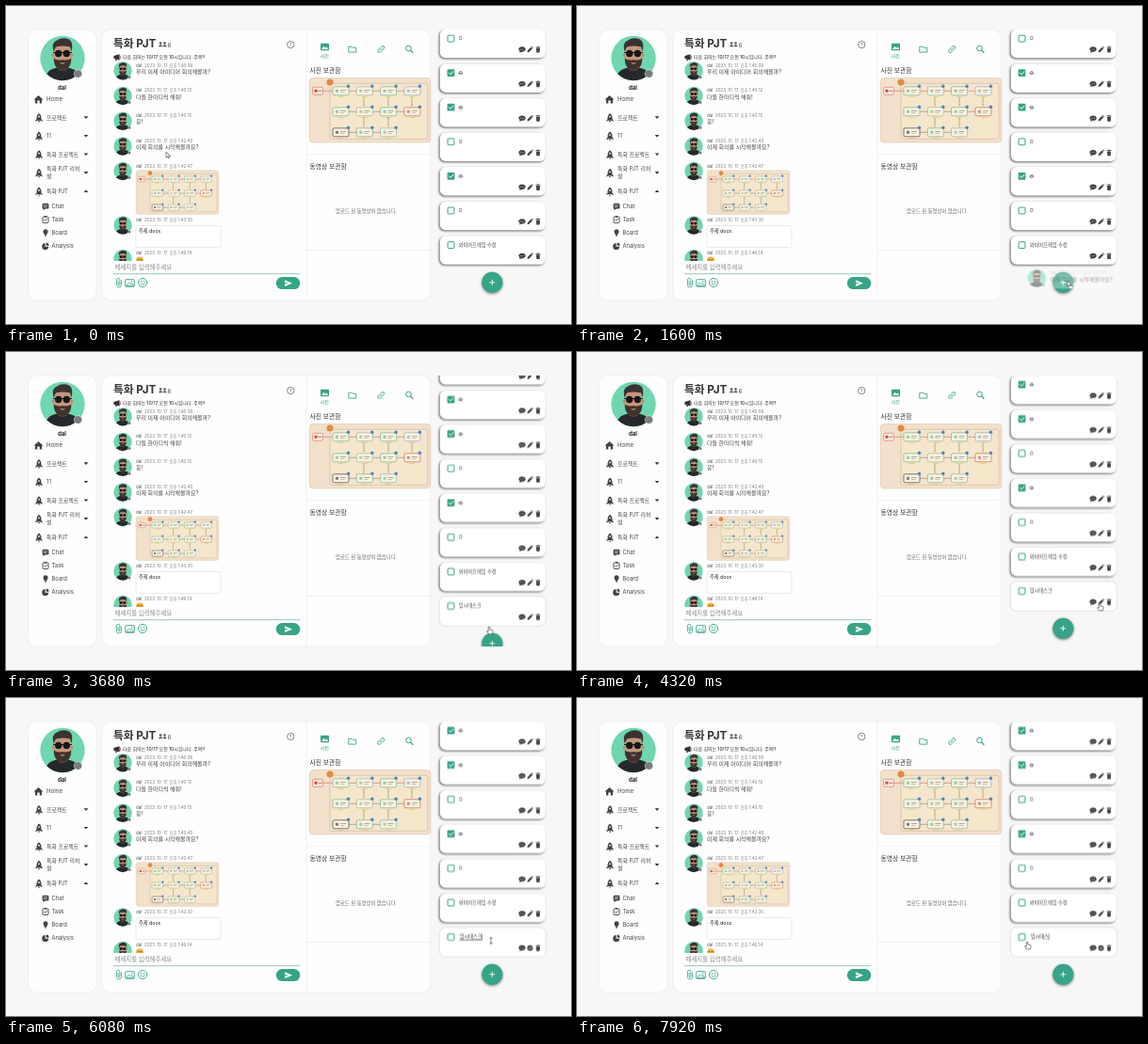
Write an HTML page that moves like this. It is 600 px wide and 338 px high and loops after 8 s.

```html
<!DOCTYPE html>
<html>
<head>
<meta charset="utf-8">
<title>Team chat</title>
<style>
html, body { margin: 0; width: 100%; height: 100%; overflow: hidden; background: #f7f7f7; }
svg { display: block; width: 100vw; height: 100vh; }
text { font-family: Inter, 'Noto Sans CJK KR', 'Noto Sans CJK', sans-serif; white-space: pre; }
.panel { fill: #fefefe; filter: drop-shadow(0 0 1px #0001); }
.card { fill: #fff; filter: drop-shadow(-.3px 1.4px 1.3px #0009); }
.card.soft { filter: drop-shadow(0 .6px 1.2px #0003); }
.fab { fill: #36a487; filter: drop-shadow(0 1.4px 1.5px #0008); }
.ln { fill: none; stroke-linecap: round; stroke-linejoin: round; }
.run, .run * { animation-duration: 8s; animation-iteration-count: infinite; animation-timing-function: linear; }
.step { animation-timing-function: step-end !important; }

#pointer { animation-name: travel; }
@keyframes travel {
  0%, 1% { transform: translate(170px, 155px); }
  2% { transform: translate(163px, 154px); }
  6.5% { transform: translate(320px, 226px); }
  11% { transform: translate(449.5px, 272.5px); }
  16% { transform: translate(508px, 289px); }
  21% { transform: translate(530px, 295px); }
  27%, 32% { transform: translate(521px, 296px); }
  38% { transform: translate(517px, 293px); }
  43%, 47% { transform: translate(513px, 292px); }
  53%, 57% { transform: translate(555px, 267px); }
  63%, 67% { transform: translate(579px, 275px); }
  74%, 90% { transform: translate(515px, 258px); }
  98%, 100% { transform: translate(478px, 259px); }
}
#list { animation-name: scroll; }
@keyframes scroll {
  0%, 44% { transform: translateY(0); }
  46% { transform: translateY(-20.5px); }
  48%, 100% { transform: translateY(-36.5px); }
}
#add { animation-name: push; }
@keyframes push { 0% { transform: translateY(0); } 43%, 100% { transform: translateY(36.5px); } }

#fresh { animation-name: fresh; }
@keyframes fresh { 0% { opacity: 0; } 43%, 100% { opacity: 1; } }
#ghost { animation-name: ghost; }
@keyframes ghost { 0% { opacity: 0; } 2% { opacity: 1; } 38%, 100% { opacity: 0; } }
#arrow { animation-name: arrow; }
@keyframes arrow { 0% { opacity: 1; } 2% { opacity: 0; } 59% { opacity: 1; } 71%, 100% { opacity: 0; } }
#deny { animation-name: deny; }
@keyframes deny { 0% { opacity: 0; } 2% { opacity: 1; } 16%, 100% { opacity: 0; } }
#drop { animation-name: drop; }
@keyframes drop { 0% { opacity: 0; } 16% { opacity: 1; } 38%, 100% { opacity: 0; } }
#hand { animation-name: hand; }
@keyframes hand { 0% { opacity: 0; } 38% { opacity: 1; } 59% { opacity: 0; } 97%, 100% { opacity: 1; } }
#beam { animation-name: beam; }
@keyframes beam { 0% { opacity: 0; } 71% { opacity: 1; } 97%, 100% { opacity: 0; } }
#view { animation-name: view; }
@keyframes view { 0% { opacity: 1; } 56%, 100% { opacity: 0; } }
#edit { animation-name: edit; }
@keyframes edit { 0% { opacity: 0; } 56%, 100% { opacity: 1; } }
#full { animation-name: full; }
@keyframes full { 0% { opacity: 0; } 56% { opacity: 1; } 95%, 100% { opacity: 0; } }
#marked { animation-name: marked; }
@keyframes marked { 0% { opacity: 0; } 74% { opacity: 1; } 95%, 100% { opacity: 0; } }
#cut { animation-name: cut; }
@keyframes cut { 0% { opacity: 0; } 95%, 100% { opacity: 1; } }
</style>
</head>
<body>
<svg id="stage" viewBox="0 0 600 338" preserveAspectRatio="none"></svg>
<script>
const GREEN = '#36a487', INK = '#444', USER = 'dal';

const text = (x, y, size, str, fill = INK, extra = '') =>
  `<text x="${x}" y="${y + size * 0.36}" font-size="${size}" fill="${fill}" ${extra}>${str}</text>`;
const bold = 'font-weight="700" ', medium = 'font-weight="500" ', mid = 'text-anchor="middle" ';
const rect = (x, y, w, h, r, attrs) => `<rect x="${x}" y="${y}" width="${w}" height="${h}" rx="${r}" ${attrs}/>`;
const circle = (x, y, r, attrs) => `<circle cx="${x}" cy="${y}" r="${r}" ${attrs}/>`;
const path = (d, attrs) => `<path d="${d}" ${attrs}/>`;
const at = (x, y, body) => `<g transform="translate(${x} ${y})">${body}</g>`;
const line = (d, w = 1, color = GREEN, extra = '') => path(d, `class="ln" stroke-width="${w}" stroke="${color}" ${extra}`);
const use = (id, x, y, s) => `<use href="#${id}" transform="translate(${x} ${y}) scale(${s})"/>`;
const ring = (w, color = GREEN) => `fill="none" stroke="${color}" stroke-width="${w}"`;
const fill = color => `fill="${color}"`;

// Avatar around the centre, radius 24
const avatar = `<g id="avatar">
  ${circle(0, 0, 23.7, fill('#6fd6b0'))}
  <g clip-path="url(#disc)">
    ${path('M-19 26C-18 13-12 10 0 10S18 13 19 26Z', fill('#26282b'))}
    ${rect(-5, 4, 10, 9, 4, fill('#8f5c44'))}
    ${circle(-9.5, -3, 2, fill('#b98a70'))}${circle(9.5, -3, 2, fill('#b98a70'))}
    ${rect(-9, -15, 18, 25, 8.5, fill('#c6977d'))}
    ${path('M-9.5-7Q-12-17-6-19Q0-23 7-20Q12-17 9.5-7L8-12Q0-14-7-12Z', fill('#3a3231'))}
    ${path('M-9.300 0Q-6 3 0 1.500Q6 3 9.300 0Q9.500 8 5 11Q0 14-5 11Q-9.500 8-9.300 0Z', fill('#40322c'))}
    ${path('M-3 5Q0 4 3 5Q0 7.500-3 5Z', fill('#b57f70'))}
    ${circle(-4.3, -5, 3.7, fill('#17181a'))}${circle(4.3, -5, 3.7, fill('#17181a'))}
    ${line('M-9.500-6H9.500', 1, '#17181a')}
  </g></g>`;

// Architecture sketch, 129 x 69
function sketch() {
  const node = (x, y, c) => at(x, y,
    rect(-8.5, -4.5, 17, 9, 1.2, `fill="#f9f1df" stroke="${c}" stroke-width=".7"`) +
    rect(-5.5, -1.6, 3, 3, .5, `fill="${c}" opacity=".7"`) +
    rect(-.5, -1.3, 6, .8, 0, fill('#9a9c94')) + rect(-.5, .7, 4.5, .8, 0, fill('#b6b3a9')) +
    circle(8, -5, 1.7, fill('#4c83bd')) +
    rect(-3, 5.6, 6, 1.2, .4, fill('#e8cd8a')));
  const colors = ['#74b48e', '#8bb7a4', '#74b48e', '#8fabc0', '#74b48e', '#9cb98a', '#74b48e', '#d66350', '#444', '#74b48e', '#8bb7a4'];
  let s = rect(.2, .2, 128.6, 68.6, 4, 'fill="#f2e0ca" stroke="#d3bda2" stroke-width=".5"') +
    rect(22, 6, 104, 59, 2, 'fill="#f5e5cf" stroke="#c4a988" stroke-width=".5"');
  for (let i = 0; i < 4; i++)
    s += rect(23.5 + i * 25.3, 8.5, 20, 54, 1, 'fill="#f5e9c6" opacity=".5"');
  s += line('M14 14H25M43 14H50M68 14H75M94 14H101', .6, '#c75545', 'stroke-dasharray="1.5 1.2"') +
    line('M43 36H50M68 36H75M94 36H101M43 58H50M68 58H75M58 20V30M84 20V30M109 20V30M58 43V52M84 43V52', .6, '#6f6a64', 'stroke-dasharray="1.5 1.2"') +
    rect(3.5, 10, 11, 8, 1.5, 'fill="#f8e9dc" stroke="#dd7f6b" stroke-width=".7"') +
    rect(5.5, 12.5, 3, 3, .5, fill('#d9493c')) + rect(9.5, 13.5, 4, .9, 0, fill('#94786c'));
  colors.forEach((c, i) => { s += node(33.5 + i % 4 * 25.3, 14 + Math.floor(i / 4) * 22, c); });
  return `<g id="sketch">${s}${circle(22, 4.7, 3.5, fill('#e08a45'))}</g>`;
}

const defs = `<defs>
  <clipPath id="disc">${circle(0, 0, 23.7, '')}</clipPath>
  <clipPath id="chatBox">${rect(102, 59.5, 217, 211.5, 0, '')}</clipPath>
  <clipPath id="listBox">${rect(452, 25.5, 140, 287.5, 0, '')}</clipPath>
  <radialGradient id="haze" gradientUnits="userSpaceOnUse" cx="162" cy="154" r="75">
    <stop stop-color="#fff" stop-opacity=".4"/><stop offset="1" stop-color="#fff" stop-opacity="0"/>
  </radialGradient>
  ${avatar}${sketch()}</defs>`;

function sidebar() {
  const rocket = path('M0-4.500Q3-2 2.400 1.500L3.600 3V4.200L1.500 3.200H-1.500L-3.600 4.200V3L-2.400 1.500Q-3-2 0-4.500ZM-1 3.600H1L0 5.500Z', fill(INK)) +
    circle(0, -1, .9, fill('#fff'));
  const caret = up => path(up ? 'M-2.300 1.200H2.300L0-1.400Z' : 'M-2.300-1.200H2.300L0 1.400Z', fill('#333'));
  let s = rect(24, 25.5, 71.5, 287, 9, 'class="panel"') +
    circle(60, 55.5, 25.3, 'fill="#fff" stroke="#eceeed" stroke-width=".5"') + use('avatar', 60, 55.5, 1) +
    circle(76.5, 72, 4.3, 'fill="#777c7c" stroke="#fff" stroke-width=".5"') +
    text(59.5, 87, 6.1, USER, '#222', bold + mid) +
    at(34.5, 99.5, path('M-5 0L0-4.500L5 0H3.600V4H1.200V1H-1.200V4H-3.600V0Z', fill(INK))) +
    text(43, 99.3, 6.1, 'Home');
  ['프로젝트', '11', '특화 프로젝트', '', '특화 PJT'].forEach((label, i) => {
    const y = 118.5 + i * 19.6;
    s += at(35, y, rocket) + text(43, y, 5.9, label) + at(85, y, caret(i === 4));
  });
  s += text(43, 173, 5.9, '특화 PJT 리허') + text(43, 181, 5.9, '설');
  const icons = [
    rect(-3.4, -3.3, 6.8, 5.8, 1.3, fill(INK)) + path('M-2.500 2V4.200L0 2Z', fill(INK)) + line('M-1.700-1.300H1.700M-1.700.500H1', .6, '#fff'),
    rect(-3, -3.2, 6, 6.6, .8, ring(.9, INK)) + line('M-1.400.200L-.300 1.300L1.600-1', .8, INK) + rect(-1.2, -4, 2.4, 1.5, .4, fill(INK)),
    circle(0, -1.4, 2.5, fill(INK)) + path('M-1.800 0H1.800L1 2.500H-1ZM-.900 3H.900L0 4.200Z', fill(INK)),
    path('M-.400-3.200V.400H3.200A3.500 3.500 0 1 1-.400-3.200ZM.600-3.700A3.200 3.200 0 0 1 3.600-.600H.600Z', fill(INK))
  ];
  ['Chat', 'Task', 'Board', 'Analysis'].forEach((label, i) => {
    const y = 213 + i * 14.1;
    s += at(42, y, icons[i]) + text(48.5, y, 5.9, label);
  });
  return s;
}

const head = (y, time) => text(138, y, 4.4, USER, '#555') + text(147, y, 4.4, '2023. 10. 17. 오후 ' + time, '#777');
const face = y => use('avatar', 124, y, .41) + circle(131, y + 7, 1.6, 'fill="#6d7474" stroke="#fff" stroke-width=".3"');
const message = (y, time, body) => face(y) + head(y - 5.7, time) + text(138, y + 1, 5.95, body);

function chat() {
  const person = x => circle(x, -1.5, 1.3, fill('#555')) +
    path(`M${x - 2} 2.200Q${x - 2} .200 ${x} .200T${x + 2} 2.200Z`, fill('#555'));
  const smile = circle(0, 0, 4.6, ring(.9)) + circle(-1.6, -1, .7, fill(GREEN)) + circle(1.6, -1, .7, fill(GREEN)) +
    line('M-2.200 1.200Q0 3.600 2.200 1.200', .8);
  return rect(102.5, 25.5, 347.5, 287, 9, 'class="panel"') +
    text(114, 40.1, 11.7, '특화 PJT', '#333', bold) +
    at(166.3, 41, person(-2.2) + person(2.2)) +
    text(171.5, 41.5, 6.5, '6', '#555') +
    circle(302.3, 41, 3.7, ring(.7, '#555')) + text(302.3, 41, 5, '?', '#555', mid) +
    at(118, 54.5, path('M-3.600-1.400L2.600-3.300V3L-3.600 1.300ZM-2.300 1.500L-1.500 3.500H0L-.500 1.800Z', fill('#333')) + line('M3.500-1.400V1.400', .7, '#c44')) +
    text(124, 54.3, 4.95, '다음 회의는 10/17 오전 10시입니다. 주목!!', '#333', medium) +
    `<g clip-path="url(#chatBox)">
      ${message(68.7, '1:40:06', '우리 이제 아이디어 회의해볼까?')}
      ${message(95.5, '1:40:12', '다들 한마디씩 해줘!')}
      ${message(122.3, '1:40:15', '응!')}
      ${message(149, '1:42:40', '이제 회의를 시작해볼까요?')}
      ${face(175.5)}${head(170, '1:42:47')}${use('sketch', 138, 174.5, .682)}
      ${face(233)}${head(227.5, '1:43:30')}
      ${rect(138, 233.5, 90, 23, 2, 'fill="#fff" stroke="#e3e3e3" stroke-width=".7"')}
      ${text(141, 239.3, 5.2, '주제.docx', '#333', medium)}
      ${face(268.5)}${head(262.8, '1:46:14')}
      ${circle(142, 270.5, 4, fill('#f2b23c'))}${circle(140.6, 269.7, .6, fill('#533'))}${circle(143.4, 269.7, .6, fill('#533'))}
    </g>` +
    text(115.5, 278, 6.4, '메세지를 입력해주세요', '#8a8a8a') +
    line('M114 284.700H312', .7, '#6fb5a2') +
    at(120, 294, line('M2.500-2V2.500A2.500 2.500 0 0 1-2.500 2.500V-3A1.700 1.700 0 0 1 .900-3V2A.800.800 0 0 1-.800 2V-1.500', .8)) +
    at(131.5, 294.5, rect(-4.8, -3.8, 9.6, 7.6, .7, ring(.9)) +
      line('M-3.600 2.500L-1-.700L1 1.300L2.200 0L3.700 2.500Z', .8) + circle(2.2, -1.7, .7, fill(GREEN))) +
    at(145, 294, smile) +
    rect(286.8, 288.1, 25.5, 13, 6.5, fill(GREEN)) +
    path('M296 291.300L304 294.700L296 298.100V295.400L300.500 294.700L296 294Z', fill('#fff'));
}

function gallery() {
  return line('M319 26V312', .7, '#ececec') +
    line('M319.500 157.700H449.500M319.500 259.500H449.500', .6, '#e9e9e9') +
    at(338.5, 43.5, rect(-4.5, -3.7, 9, 7.4, .8, fill(GREEN)) + path('M-3.600 2.600L-1-.800L.700 1.200L2-.300L3.700 2.600Z', fill('#fff'))) +
    text(338.3, 53, 5, '사진', GREEN, mid) +
    at(368, 46, line('M-3.800-2.800H-.800L.300-1.700H3.800V3.100H-3.800Z', .9)) +
    at(398.2, 46, `<g transform="rotate(-45)">${line('M-.700-1.700H-2.500A1.700 1.700 0 0 0-2.500 1.700H-.700M.700-1.700H2.500A1.700 1.700 0 0 1 2.500 1.700H.700M-1.600 0H1.600', .9)}</g>`) +
    at(428, 45.5, circle(-.5, -.5, 2.8, ring(1)) + line('M1.700 1.700L4 4', 1.2)) +
    text(322.5, 69, 6.8, '사진 보관함', '#333', medium) +
    use('sketch', 322, 76.3, 1) +
    text(322.5, 170.3, 6.8, '동영상 보관함', '#333', medium) +
    text(382.5, 218.5, 5.35, '업로드 된 동영상이 없습니다.', '#666', mid);
}

const bubble = path('M0-3C5-3 5 2.400 0 2.400L-2.800 3.200L-2.400 1.600C-5-.400-3-3 0-3Z', fill(INK)) +
  [-1.5, 0, 1.5].map(x => circle(x, -.2, .45, fill('#fff'))).join('');
const pencil = path('M-3 3L-2.600 1L1-2.600L2.600-1L-1 2.600ZM1.500-3L2.200-3.500L3.500-2.200L3-1.500Z', fill(INK));
const trash = path('M-2.500-2.900H-1L-.600-3.400H.600L1-2.900H2.500V-2.100H-2.500ZM-2-1.600H2L1.700 3.300H-1.700Z', fill(INK));
const done = circle(0, 0, 3, fill(INK)) + line('M-1.300 0L-.300 1L1.400-.900', .7, '#fff');

// y is the centre of the label row
function card(y, label, checked, soft) {
  const box = checked
    ? rect(468.6, y - 3.9, 7.8, 7.8, .9, fill(GREEN)) + line(`M470.4 ${y}L472 ${y + 1.7}L474.9 ${y - 1.5}`, 1, '#fff')
    : rect(469.1, y - 3.3, 6.8, 6.8, .7, `fill="#fff" stroke="${GREEN}" stroke-width="1"`);
  return rect(460.8, y - 9.7, 112, 30.5, 6, `class="card${soft ? ' soft' : ''}"`) + box +
    (soft ? '' : text(480.8, y, 5.2, label) + at(556.5, y + 11.8, pencil)) +
    (checked ? line(`M480.7 ${y + .2}H485`, .6, '#333') : '') +
    at(548, y + 11.8, bubble) + at(565, y + 11.8, trash);
}

function tasks() {
  const y = 290.5, ticks = [0, 1, 1, 0, 1, 0, 0];
  const cards = ticks.map((on, i) => card(34.5 + i * 36.58, i < 6 ? 'O' : '와이어프레임 수정', on)).join('');
  const caret = x => line(`M${x} ${y - 3}V${y + 3}`, .5, '#222');
  return `<g clip-path="url(#listBox)"><g id="list" class="run">${cards}
    <g id="fresh" class="step">${card(y, '', 0, true)}
      <g id="view" class="step">${text(480.8, y, 5.2, '임시태스크')}${at(556.5, y + 11.8, pencil)}</g>
      <g id="edit" class="step">${at(556.5, y + 11.8, done)}</g>
      <g id="full" class="step">${text(481.7, y, 5.2, '임시태스크', '#333')}${caret(505.7)}</g>
      <g id="marked" class="step">${line(`M482 ${y + 3.3}H505`, .6, '#222')}</g>
      <g id="cut" class="step">${text(481.7, y, 5.2, '임시태스', '#333')}${caret(501)}</g>
    </g>
    <g id="add" class="step">${circle(516.3, 293.8, 11, 'class="fab"')}${line('M513.800 293.800H518.800M516.300 291.300V296.300', .9, '#fff')}</g>
  </g></g>`;
}

function pointer() {
  const arrow = path('M0 0V6.200L1.500 4.900L2.500 7L3.500 6.500L2.500 4.500H4.500Z', 'fill="#fff" stroke="#333" stroke-width=".6"');
  return `<g id="pointer" class="run">
    <g id="ghost" class="step"><g transform="translate(-161.5 -153.6)">
      ${rect(113, 138, 199, 22, 0, 'fill="url(#haze)"')}
      <g opacity=".48">${face(149)}${text(138, 150, 5.95, '이제 회의를 시작해볼까요?')}</g>
      <g opacity=".2">${head(143.3, '1:42:40')}</g>
    </g></g>
    <g id="arrow" class="step">${arrow}</g>
    <g id="deny" class="step">${circle(0, 0, 2.5, 'fill="#fff" stroke="#111" stroke-width="1.1"')}${line('M-1.700-1.700L1.700 1.700', 1, '#111')}</g>
    <g id="drop" class="step">${at(-5, -2, arrow + rect(1.5, 5.5, 3.8, 3, .3, 'fill="#fff" stroke="#333" stroke-width=".5" stroke-dasharray=".8 .6"'))}</g>
    <g id="hand" class="step">${path('M-.800.500Q0-.500.800.500V3L3.700 3.700Q4.300 4 4 5.500L3.300 8H-.200L-2.500 5Q-2.300 3.900-.800 5Z', 'fill="#fff" stroke="#333" stroke-width=".6"')}</g>
    <g id="beam" class="step">${line('M-1.200-3H1.200M0-3V3M-1.200 3H1.200', .6, '#333')}</g>
  </g>`;
}

document.getElementById('stage').innerHTML = defs + sidebar() + chat() + gallery() + tasks() + pointer();
</script>
</body>
</html>
```
